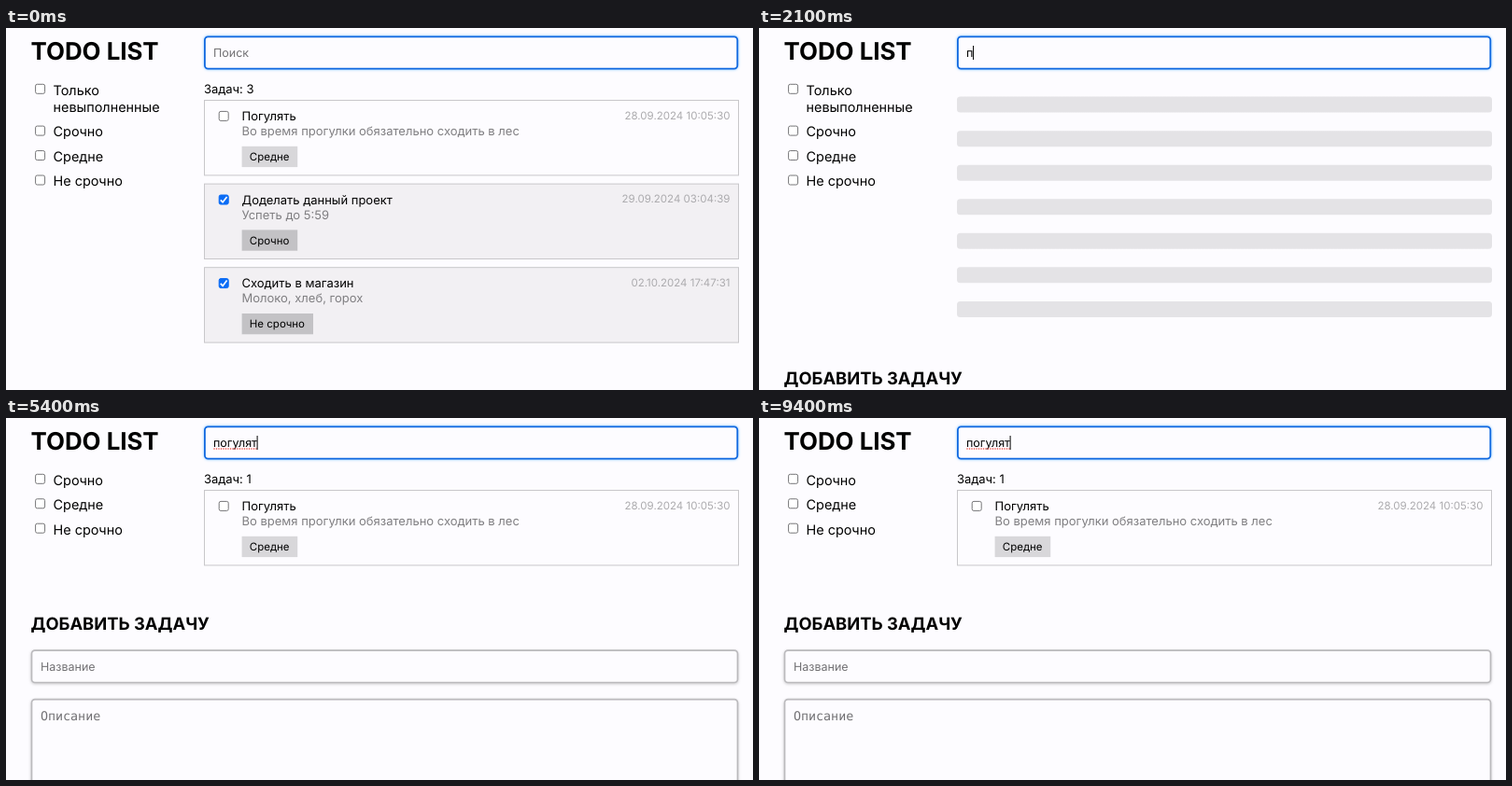
An HTML page for the animation above (9500 ms loop, 800 by 388 pixels).

```html
<!DOCTYPE html>
<html lang="ru">
<head>
<meta charset="utf-8">
<title>Todo list</title>
<style>
  html, body { margin: 0; width: 100%; height: 100%; overflow: hidden; background: #fdfcff; }
  svg { display: block; width: 800px; height: 388px; font: 13px Inter, "Noto Sans", sans-serif; }
  text { white-space: pre; text-rendering: geometricPrecision; }
  .h1 { font-size: 25.9px; font-weight: 700; }
  .h2 { font-size: 18.35px; font-weight: 700; }
  .side { font-size: 14.45px; }
  .field { font-size: 12.5px; }
  .hint { fill: #727174; }
  .mono { font: 13.33px "DejaVu Sans Mono", monospace; }
  .desc { fill: #7f7e81; }
  .date { font-size: 11.5px; fill: #acabae; text-anchor: end; }
  .tag { font-size: 11.5px; }
  .box { fill: #fff; stroke: #767678; }
  .on .box { fill: #0a6cf5; stroke: #0a6cf5; }
  .tick { fill: none; stroke: #fff; stroke-width: 1.7; visibility: hidden; }
  .on .tick { visibility: visible; }
  .card { fill: #fdfcff; stroke: #c8c7ca; }
  .on .card { fill: #f2f0f3; }
  .label { fill: #d8d7da; }
  .on .label { fill: #c3c2c5; }
  .input { fill: #fdfcff; stroke: #bbbabd; stroke-width: 1.7; filter: drop-shadow(0 1px 1.5px #0003); }
  .focus { stroke: #1068e0; stroke-width: 1.8; filter: drop-shadow(0 0 1.5px #7cc4ff); }
  .typo { stroke: #f0392e; stroke-width: 1.5; stroke-linecap: round; stroke-dasharray: 0 2.5; }
</style>
</head>
<body>
<svg viewBox="0 0 800 388">
  <defs>
    <linearGradient id="shine" gradientUnits="userSpaceOnUse" x1="-361" x2="212" y1="0" y2="0">
      <stop offset="0" stop-color="#e4e3e6"/>
      <stop offset=".5" stop-color="#f5f4f7"/>
      <stop offset="1" stop-color="#e4e3e6"/>
    </linearGradient>
  </defs>

  <text class="h1" x="26.5" y="34.4">TODO LIST</text>
  <g id="undone"></g>
  <g id="levels"></g>

  <rect class="input focus" x="212.9" y="9.4" width="570.4" height="34.2" rx="3.5"/>
  <text id="hint" class="field hint" x="222" y="31">Поиск</text>
  <text id="query" class="field" x="222" y="31"></text>
  <path id="typo" class="typo" d="M223 33H270"/>
  <rect id="caret" y="19" width="1" height="15"/>

  <g id="list"><text id="count" x="212" y="69.8"></text></g>
  <g id="bars" fill="url(#shine)"></g>

  <g id="form">
    <text class="h2" x="26.5" y="227">ДОБАВИТЬ ЗАДАЧУ</text>
    <rect class="input" x="27.5" y="249.2" width="756" height="34.3" rx="3.5"/>
    <text class="field hint" x="37" y="270.8">Название</text>
    <rect class="input" x="27.5" y="301.7" width="756" height="120" rx="3.5"/>
    <text class="mono hint" x="37" y="324">Описание</text>
  </g>
</svg>
<script>
const LOOP = 9500, BLINK = 500, CARD_STEP = 89.6;
const WORD = 'погулят';
const KEYS = [2100, 2600, 2900, 3200, 3500, 3800, 4400];
const LOADS = [[2100, 2200], [5000, 5400]];
const $ = id => document.getElementById(id);

const add = (parent, html) => parent.insertAdjacentHTML('beforeend', html);
const show = (el, on) => el.style.display = on ? '' : 'none';
const shift = (el, y) => el.setAttribute('transform', `translate(0 ${y})`);

const checkbox = (x, y) =>
  `<g transform="translate(${x} ${y})"><rect class="box" x="-5" y="-5" width="10" height="10" rx="1.8"/>
   <path class="tick" d="M-3.4 .3L-1.1 2.8L3.4-3"/></g>`;

const filter = (y, ...lines) => checkbox(36.6, y) +
  lines.map((s, i) => `<text class="side" x="50.5" y="${y + 6.4 + i * 18.2}">${s}</text>`).join('');

const card = (i, done, title, desc, tag, tagWidth, date) =>
  `<g class="${done ? 'on' : ''}" transform="translate(0 ${i * CARD_STEP})">
   <rect class="card" x="212.5" y="77.5" width="572" height="80.4"/>
   ${checkbox(233.2, 94.4)}
   <text x="252.5" y="99.3">${title}</text>
   <text class="desc" x="252.5" y="115.3">${desc}</text>
   <rect class="label" x="252.6" y="126.8" width="${tagWidth}" height="22.3"/>
   <text class="tag" x="260.8" y="142.2">${tag}</text>
   <text class="date" x="775.5" y="97.7">${date}</text></g>`;

add($('undone'), filter(65.3, 'Только', 'невыполненные'));
['Срочно', 'Средне', 'Не срочно'].forEach((s, i) => add($('levels'), filter(65.3 + i * 26.45, s)));
add($('list'),
  card(0, false, 'Погулять', 'Во время прогулки обязательно сходить в лес', 'Средне', 59.6, '28.09.2024 10:05:30') +
  card(1, true, 'Доделать данный проект', 'Успеть до 5:59', 'Срочно', 59.6, '29.09.2024 03:04:39') +
  card(2, true, 'Сходить в магазин', 'Молоко, хлеб, горох', 'Не срочно', 76.4, '02.10.2024 17:47:31'));
for (let i = 0; i < 7; i++)
  add($('bars'), `<rect x="212" y="${73.6 + i * 36.55}" width="573" height="17" rx="3.5"/>`);

const cards = [...$('list').querySelectorAll('g[class]')];

function draw(t) {
  const typed = KEYS.filter(k => k <= t);
  const load = LOADS.find(([from, to]) => t >= from && t < to);
  const total = t < LOADS[0][1] ? 3 : t < LOADS[1][1] ? 2 : 1;

  $('query').textContent = WORD.slice(0, typed.length);
  show($('hint'), !typed.length);
  show($('typo'), total === 1);

  const lastKey = typed.length ? typed[typed.length - 1] : 100 - 2 * BLINK;
  show($('caret'), Math.floor((t - lastKey) / BLINK) % 2 === 0);
  $('caret').setAttribute('x', 222 + (typed.length ? $('query').getComputedTextLength() - .3 : 0));

  show($('undone'), total > 1);
  shift($('levels'), total > 1 ? 44.8 : 0);

  show($('list'), !load);
  show($('bars'), load);
  $('count').textContent = 'Задач: ' + total;
  cards.forEach((c, i) => show(c, i < total));
  shift($('form'), load ? 154.7 : (total - 1) * CARD_STEP);

  if (load) {
    const p = (t - load[0]) / 1500;
    $('shine').setAttribute('gradientTransform', `translate(${1146 * 2 * p * p} 0)`);
  }
}

const start = performance.now();
function tick() {
  draw((performance.now() - start) % LOOP);
  requestAnimationFrame(tick);
}
tick();
</script>
</body>
</html>
```
